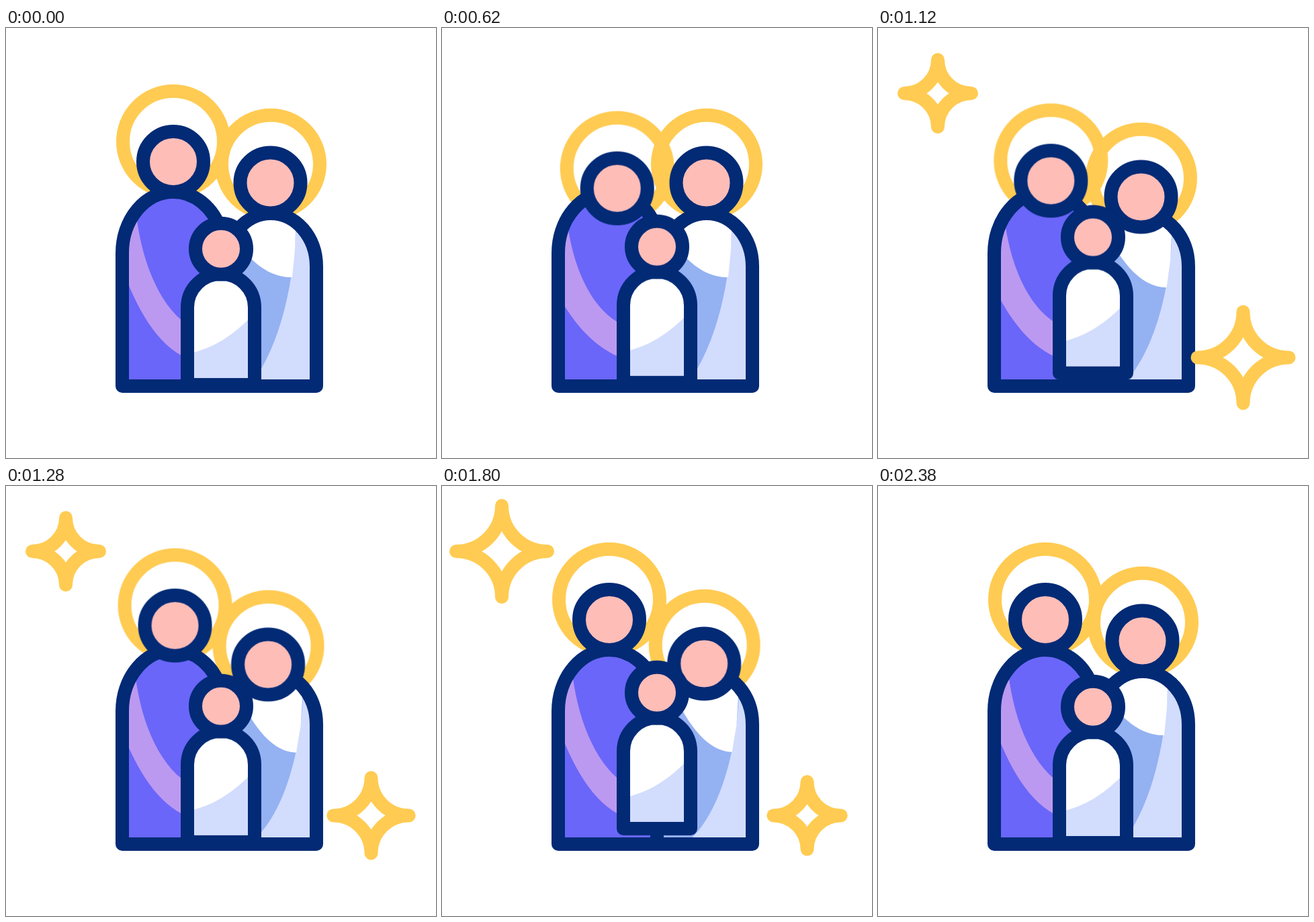
An HTML page without scripts that plays this animation: 640x640 px, repeating every 2.4 s.

```html
<!DOCTYPE html>
<html lang="en">
<head>
<meta charset="utf-8">
<title>Family</title>
<style>
  html, body { margin: 0; width: 100%; height: 100%; overflow: hidden; background: #fff; }
  svg { display: block; width: 100vw; height: 100vh; }

  .line { fill: none; stroke: #022a75; stroke-width: 20; stroke-linejoin: round; }
  .face { fill: #ffbdb8; }
  .white { fill: #fff; }
  .purple { fill: #6a66f9; }
  .lilac { fill: #bb99f1; }
  .blue { fill: #94b1f2; }
  .pale { fill: #d2dcfd; }
  .gold { fill: none; stroke: #ffcb52; stroke-width: 20; stroke-linejoin: round; stroke-linecap: round; }

  .father, .mother, .child, .sash, .veil, .cloak, .star {
    animation: 2400ms cubic-bezier(.455, .03, .515, .955) infinite;
  }
  .father { animation-name: bow-left; }
  .sash { animation-name: sash; }
  .mother { animation-name: bow-right; }
  .veil { animation-name: veil; }
  .cloak { animation-name: cloak; }
  .child { animation-name: hop; }
  .star { visibility: hidden; }
  .star.one { animation-name: twinkle-one; }
  .star.two { animation-name: twinkle-two; }

  @keyframes bow-left {
    0%, 61.1%, 100% { transform: none; }
    30.55%, 37.5% { transform: translate(12.3px, 41.7px); }
  }
  @keyframes sash {
    0%, 61.1%, 100% { d: path("M193 270C200 340 225 410 270 442V492C225 472 195 420 170 350Z"); }
    30.55%, 37.5% { d: path("M185 280C192 350 220 420 270 442V492C230 478 198 445 170 395Z"); }
  }
  @keyframes bow-right {
    0%, 32.5%, 95.8%, 100% { transform: none; }
    61.1%, 66.67% { transform: translate(-4px, 41px); }
  }
  @keyframes veil {
    0%, 32.5%, 95.8%, 100% { d: path("M330 290C352 340 387 372 426 371L430 330 432 270V250H330Z"); }
    61.1%, 66.67% { d: path("M330 270C358 345 391 400 433 401L440 362 445 290V250H330Z"); }
  }
  @keyframes cloak {
    0%, 32.5%, 95.8%, 100% { d: path("M432 270C432 370 410 470 365 530H320V270Z"); }
    61.1%, 66.67% { d: path("M445 290C444 385 418 490 365 530H320V290Z"); }
  }
  @keyframes hop {
    0%, 22.2%, 55.55%, 83.33%, 100% { transform: none; }
    38.9%, 69.45% { transform: translateY(-32px); }
  }

  /* arms change length while the line weight stays the same */
  @keyframes twinkle-one {
    0%, 26%, 84.8%, 100% { visibility: hidden; d: path("M0 0a0 0 0 0 0 0 0 0 0 0 0 0 0 0 0 0 0 0 0 0 0 0 0 0 0 0 0 0 0z"); }
    37.8%, 72.7% { visibility: visible; d: path("M0-68a68 68 0 0 0 68 68 68 68 0 0 0-68 68 68 68 0 0 0-68-68 68 68 0 0 0 68-68z"); }
    44.8%, 63.3% { visibility: visible; d: path("M0-50a50 50 0 0 0 50 50 50 50 0 0 0-50 50 50 50 0 0 0-50-50 50 50 0 0 0 50-50z"); }
  }
  @keyframes twinkle-two {
    0%, 37.5%, 95.8%, 100% { visibility: hidden; d: path("M0 0a0 0 0 0 0 0 0 0 0 0 0 0 0 0 0 0 0 0 0 0 0 0 0 0 0 0 0 0 0z"); }
    49.3%, 83.7% { visibility: visible; d: path("M0-68a68 68 0 0 0 68 68 68 68 0 0 0-68 68 68 68 0 0 0-68-68 68 68 0 0 0 68-68z"); }
    56.3%, 74.5% { visibility: visible; d: path("M0-50a50 50 0 0 0 50 50 50 50 0 0 0-50 50 50 50 0 0 0-50-50 50 50 0 0 0 50-50z"); }
  }
</style>
</head>
<body>
<svg viewBox="0 0 640 640">
  <defs>
    <path id="left-body" d="M320 533H173V335A76 91 0 0 1 249 244A76 91 0 0 1 320 302Z"/>
    <path id="right-body" d="M320 533H462V355A68 79 0 0 0 394 276A68 79 0 0 0 326 355L320 365Z"/>
    <path id="child-body" d="M270 531V416A50 50 0 0 1 370 416V531Z"/>
    <clipPath id="right-clip"><use href="#right-body"/></clipPath>
  </defs>

  <circle class="father gold" cx="249" cy="169" r="75"/>
  <circle class="mother gold" cx="394" cy="202.7" r="73"/>

  <g clip-path="url(#right-clip)">
    <use class="pale" href="#right-body"/>
    <path class="cloak blue" d="M432 270C432 370 410 470 365 530H320V270Z"/>
    <path class="veil white" d="M330 290C352 340 387 372 426 371L430 330 432 270V250H330Z"/>
  </g>
  <use class="line" href="#right-body"/>

  <use class="purple" href="#left-body"/>
  <path class="sash lilac" d="M193 270C200 340 225 410 270 442V492C225 472 195 420 170 350Z"/>
  <use class="line" href="#left-body"/>

  <g class="father">
    <circle class="face" cx="249" cy="199" r="45"/>
    <circle class="line" cx="249" cy="199" r="45"/>
  </g>
  <g class="mother">
    <circle class="face" cx="393.5" cy="230.5" r="45"/>
    <circle class="line" cx="393.5" cy="230.5" r="45"/>
  </g>

  <g class="child">
    <use class="white" href="#child-body"/>
    <path class="pale" d="M270 485Q324 475 370 424V531H270Z"/>
    <use class="line" href="#child-body"/>
    <circle class="face" cx="320" cy="328.7" r="38"/>
    <circle class="line" cx="320" cy="328.7" r="38"/>
  </g>

  <g transform="translate(89 97.3)"><path class="star one gold" d="M0 0"/></g>
  <g transform="translate(543.5 490.4)"><path class="star two gold" d="M0 0"/></g>
</svg>
</body>
</html>
```
